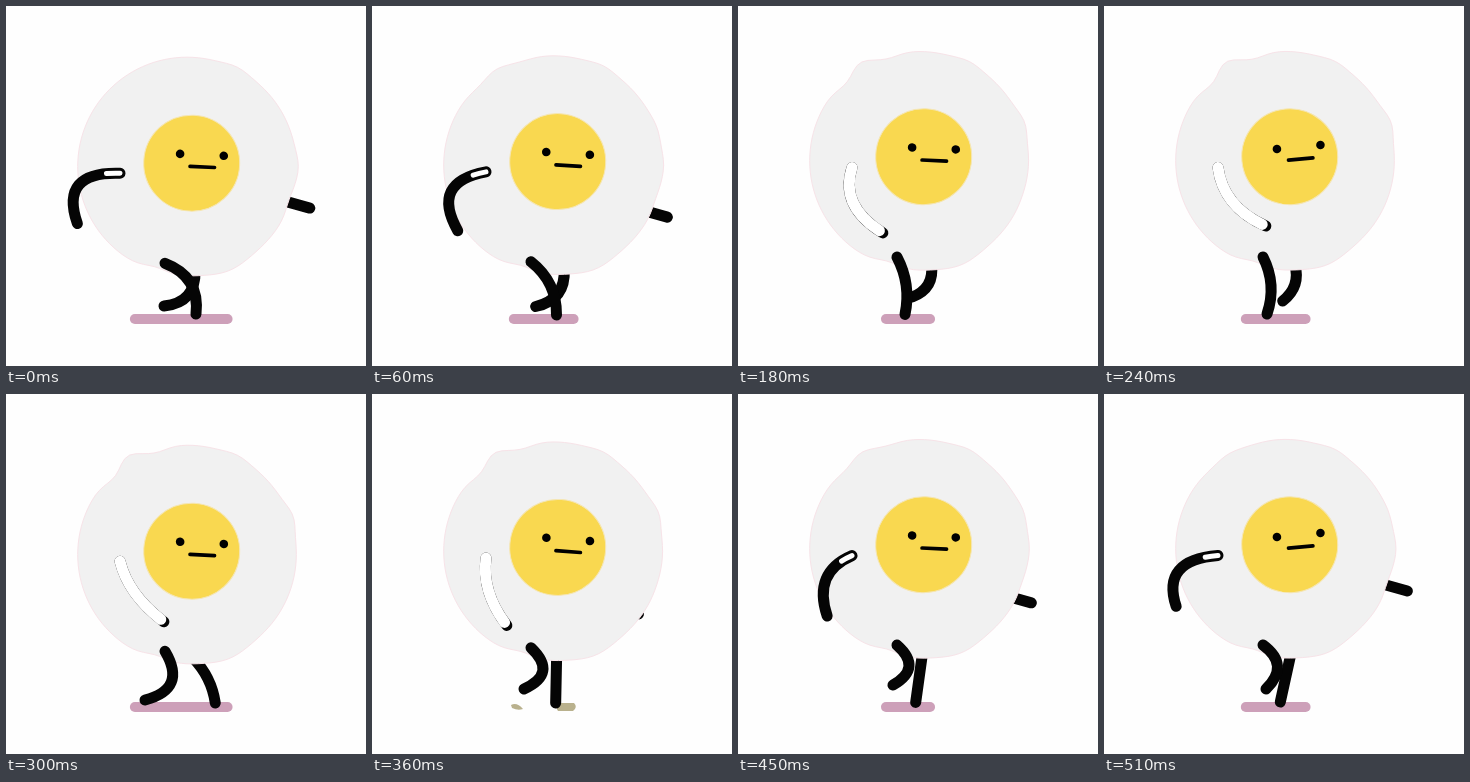
Animation, 360 px wide and 360 px high, one loop 0.54 s. Source, as an HTML page:

```html
<!DOCTYPE html>
<html lang="en">
<head>
<meta charset="utf-8">
<title>Walking egg</title>
<style>
html, body { margin: 0; width: 100%; height: 100%; overflow: hidden; background: #fefefe; }
svg { display: block; width: 100vw; height: 100vh; }
.limb { fill: none; stroke: #050505; stroke-width: 11; stroke-linecap: round; }
</style>
</head>
<body>
<svg viewBox="0 0 360 360">
  <path id="shadow" fill="none" stroke="#cda0b9" stroke-width="10" stroke-linecap="round"/>
  <g id="scraps" fill="#b9b18d">
    <path d="M139 311Q145 308 151 315Q146 317 140 314Z"/>
    <path d="M186 309H202Q206 313 201 317H186Q183 313 186 309Z"/>
  </g>
  <path id="backArm" class="limb"/>
  <path id="backLeg" class="limb"/>
  <path id="body" fill="#f1f1f1" stroke="#f7e3e8" stroke-width="1"/>
  <g id="face">
    <circle r="48" fill="#f9d850" stroke="#f5e6b4" stroke-width="1"/>
    <circle cx="-12" cy="-8.8" r="4.3"/>
    <circle cx="31.7" cy="-8.8" r="4.3"/>
    <path d="M-1.5 3.3H23" stroke="#000" stroke-width="3.7" stroke-linecap="round"/>
  </g>
  <path id="frontLeg" class="limb"/>
  <path id="frontArm" class="limb"/>
  <path id="shine" fill="none" stroke="#fff" stroke-linecap="round" pathLength="100"/>
</svg>
<script>
const LOOP = 540, STEP = 30, HALF = LOOP / 2, TAU = Math.PI * 2;
const { sin, cos, exp, max, min, abs, hypot, PI } = Math;
const el = id => document.getElementById(id);
const set = (id, name, value) => el(id).setAttribute(name, value);
const show = (id, on) => set(id, "visibility", on ? "visible" : "hidden");
const bell = x => exp(-x * x);

// One stride of a leg: time, foot x, foot y, knee bend.
const stride = [
  [0, 190, 308, 23], [30, 196, 309, 21], [90, 173, 309, 8],
  [240, 163, 308, 12], [270, 143, 300, 35], [300, 139, 306, 35],
  [360, 152, 295, 31], [450, 155, 291, 28], [510, 162, 295, 26]
];

function step(t) {
  const i = stride.findLastIndex(row => row[0] <= t);
  const a = stride[i], b = stride[(i + 1) % stride.length];
  const k = (t - a[0]) / ((b[0] || LOOP) - a[0]);
  return a.map((v, j) => v + (b[j] - v) * k).slice(1);
}

// The knee sits beside the middle of the line from hip to foot.
function leg(hx, hy, fx, fy, bend) {
  const dx = fx - hx, dy = fy - hy, k = bend / hypot(dx, dy);
  return `M${hx} ${hy}Q${hx + dx / 2 + dy * k} ${hy + dy / 2 - dx * k} ${fx} ${fy}`;
}

// A circle with dents and bumps; some of them grow with w.
function outline(w) {
  const bumps = [ // degrees, width, height
    [0, 8, 2 - 2 * w], [19, 8, 2 * w - 2], [68, 12, 3], [107, 9, -4], [297, 8, 2],
    [226, 8, -3.5 * w], [239, 7, 6 * w], [254, 8, -3 * w], [340, 8, 3.5 * w]
  ];
  let d = "";
  for (let a = 0; a < 360; a += 3) {
    let r = 109.3;
    for (const [at, width, height] of bumps) {
      const gap = abs(a - at);
      r += height * bell(min(gap, 360 - gap) / width);
    }
    const rad = a * PI / 180;
    d += `${d ? "L" : "M"}${181 + r * cos(rad)} ${160.7 + r * sin(rad)}`;
  }
  return d + "Z";
}

function drawBody(t, p, land) {
  const u = p / 180;
  const tilt = 2.6 + 13.4 * u * u * (1 - u);
  set("face", "transform", `translate(185.7 ${150.7 + 6.7 * land}) rotate(${tilt})`);
  set("body", "d", outline(sin(PI * t / LOOP)));
  set("body", "transform", `translate(0 ${6 * land - 6})`);

  const gap = abs(p - 15);
  const spread = bell(min(gap, HALF - gap) / 40);
  const mid = 170 + 6 * spread, half = 22 + 28 * spread;
  set("shadow", "d", `M${mid - half} 313H${mid + half}`);
}

function drawLegs(t, land) {
  const hip = 251 + 6.5 * land;
  set("frontLeg", "d", leg(159, hip, ...step(t)));

  const late = (t + HALF) % LOOP;
  const shift = 15 - 5 * sin(TAU * late / LOOP);
  const [x, y, bend] = step(late);
  set("backLeg", "d", leg(174 + shift, hip + 7, x + shift, y, max(0, bend - 13)));
}

function drawArms(t, land) {
  const angle = TAU * (t / LOOP + .02);
  const c = cos(angle), drop = 6 * land;

  const elbow = [88 - 34 * c - 9 * sin(angle), 193 - 18 * c - 10 * c * c];
  const hand = [117 - 46 * c, 229.5 - 14 * c * c - 4 * c + drop];
  const arm = `M114 ${161.5 + drop}Q${elbow} ${hand}`;
  set("frontArm", "d", arm);
  set("shine", "d", arm);

  // White fills the arm as it swings forward.
  const behind = c > .5;
  set("shine", "stroke-width", behind ? 5 : 11);
  set("shine", "stroke-dasharray", behind ? "16 100" : c < -.3 ? "95 100" : "29 37 25 100");

  const x = 277 + 27 * c, y = 218 - 5 * c - 17 * c * c + drop;
  set("backArm", "d", `M${x - 25} ${y - 7}L${x} ${y}`);
}

function draw(ms) {
  let t = Math.floor(ms % LOOP / STEP) * STEP;
  if (t === 390) t = 360; // this pose is held twice as long
  const p = t % HALF;
  const land = bell((p - 15) / 80);
  drawBody(t, p, land);
  drawLegs(t, land);
  drawArms(t, land);
  show("shadow", t !== 360);
  show("scraps", t === 360);
}

const start = performance.now();
function tick() {
  draw(performance.now() - start);
  requestAnimationFrame(tick);
}
tick();
</script>
</body>
</html>
```
